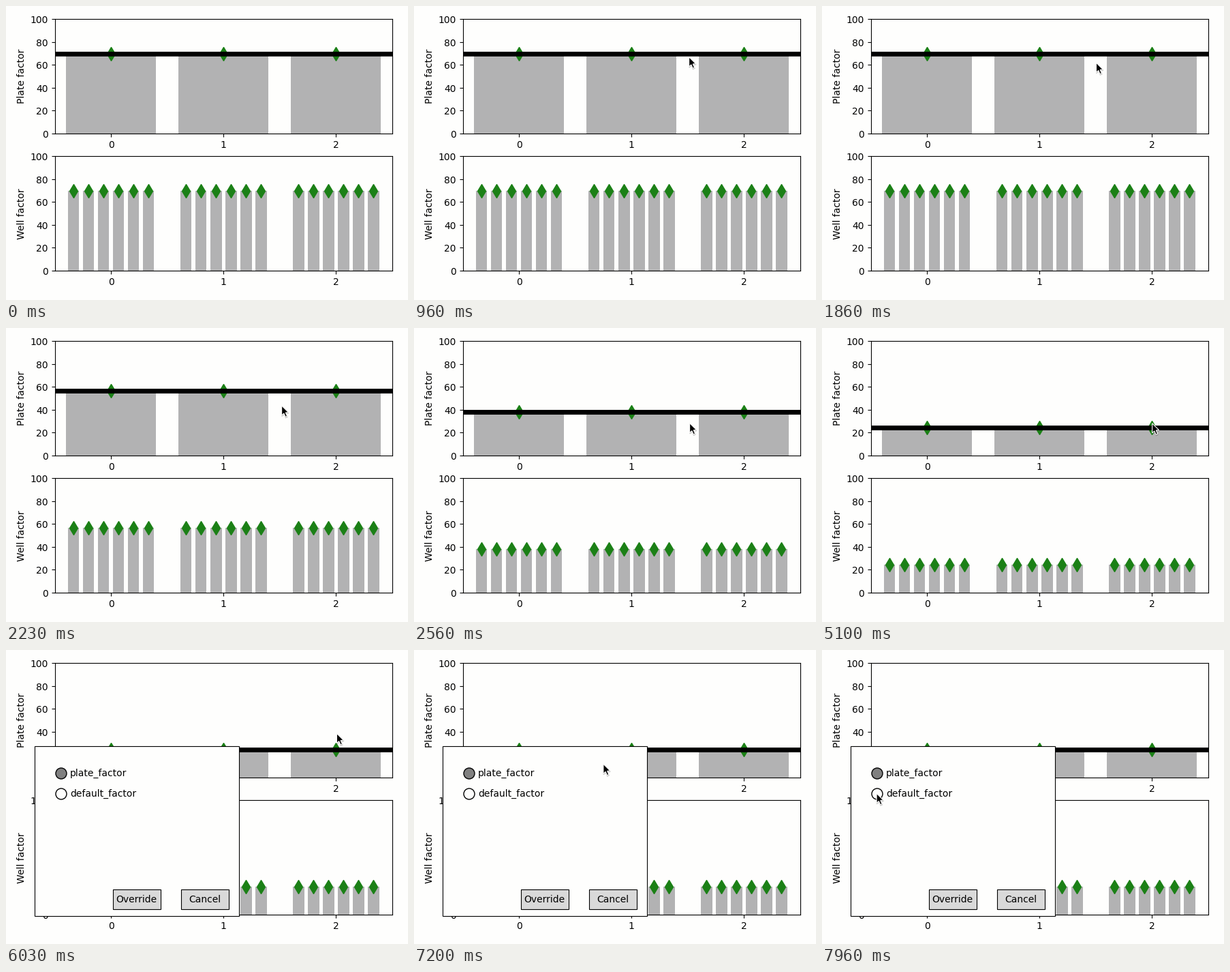
A matplotlib script that plays this animation: 590 by 431 pixels, repeating every 8000 ms.

```python
import numpy as np
import matplotlib.pyplot as plt
from matplotlib.animation import FuncAnimation
from matplotlib.patches import Circle, Polygon, Rectangle

W, H, DPI = 590, 431, 100
INTERVAL, FRAMES = 25, 320
PAPER, BAR, GREEN = "#fefefd", "#b2b2b3", "#1b8016"
LEFT, RIGHT, AXES_HEIGHT = 71.5, 567, 167.5
DIALOG_TIME = 5730

plt.rcParams["font.family"] = "DejaVu Sans"
plt.rcParams["font.size"] = 10
# The small surplus keeps the pixel size from being rounded down
fig = plt.figure(figsize=((W + 0.01) / DPI, (H + 0.01) / DPI), dpi=DPI, facecolor=PAPER)


def factor_axes(bottom, label):
    ax = fig.add_axes([LEFT / W, 1 - bottom / H, (RIGHT - LEFT) / W, AXES_HEIGHT / H],
                      facecolor=PAPER)
    ax.set(xlim=(-0.5, 2.5), ylim=(0, 100), xticks=range(3),
           yticks=range(0, 101, 20), ylabel=label)
    return ax


def bars_with_markers(ax, centers, width):
    bars = ax.bar(centers, 70, width, color=BAR, zorder=1)
    markers, = ax.plot(centers, np.full(len(centers), 70), "d", ms=10, color=GREEN, zorder=2.6)
    ax.set(xlim=(-0.5, 2.5), ylim=(0, 100))
    return bars, markers


plate_ax = factor_axes(187, "Plate factor")
well_ax = factor_axes(388, "Well factor")
wells = (np.arange(3)[:, None] + (np.arange(6) - 2.5) * 0.8 / 6).ravel()
groups = [bars_with_markers(plate_ax, np.arange(3), 0.8),
          bars_with_markers(well_ax, wells, 0.1)]
level_line = plate_ax.axhline(70, color="black", lw=5, zorder=3)

# Overlay in pixel coordinates, y pointing down
overlay = fig.add_axes([0, 0, 1, 1], zorder=5)
overlay.set(xlim=(0, W), ylim=(H, 0))
overlay.axis("off")
dialog = []


def box(x, y, w, h, color):
    dialog.append(overlay.add_patch(
        Rectangle((x, y), w, h, fc=color, ec="black", lw=0.8, zorder=5)))


def text(x, y, label, ha):
    dialog.append(overlay.text(x, y, label, ha=ha, va="center", zorder=6))


box(41.5, 141.5, 300, 249, PAPER)
for y, label, color in [(181, "plate_factor", "0.5"), (211, "default_factor", PAPER)]:
    dialog.append(overlay.add_patch(Circle((81, y), 8, fc=color, ec="black", lw=1, zorder=6)))
    text(94, y, label, "left")
for x, label in [(156.5, "Override"), (256.5, "Cancel")]:
    box(x, 351.5, 70, 29, "0.85")
    text(x + 35, 366, label, "center")

ARROW = np.array([(0.6, 0.8), (0.6, 15), (3.8, 12), (6.2, 17.3), (8.6, 16.2),
                  (6.3, 11), (10.6, 10.7)])
shadow = overlay.add_patch(Polygon(ARROW, fc="black", ec="black", lw=1.2, alpha=0.15, zorder=8))
arrow = overlay.add_patch(Polygon(ARROW, fc="black", ec=PAPER, lw=0.8, zorder=9))


def smooth(s):
    return s * s * (3 - 2 * s)


def ease_out(s):
    return 1 - (1 - s) ** 2


def late_smooth(s):
    return smooth(s ** 0.75)


def linear(s):
    return s


# start, end, destination, easing
MOVES = [
    (430, 960, (403, 74), ease_out),
    (1100, 1330, (400, 71), smooth),
    (1490, 1510, (401, 70), smooth),
    (1730, 2230, (404, 113), late_smooth),
    (2230, 2530, (404, 137), linear),
    (2530, 2760, (404, 145), ease_out),
    (4460, 4900, (484, 139), smooth),
    (5100, 5170, (484.5, 138), smooth),
    (5320, 5340, (484.5, 137.5), smooth),
    (5730, 6200, (485, 115), smooth),
    (6860, 7680, (97, 211), late_smooth),
    (7690, 7960, (79.5, 209.5), smooth),
]


def cursor_at(t):
    pos = np.array([565.0, 186.0])
    for start, end, goal, ease in MOVES:
        if t <= start:
            break
        pos += (np.array(goal) - pos) * ease(min(1, (t - start) / (end - start)))
    return pos


def level_at(t):
    return np.interp(t, [1850, 2000, 2230, 2530, 2700, 2850, 3000],
                     [70, 67, 57, 39.3, 31, 26, 24.2])


def update(i):
    t = i * INTERVAL + 6
    level = level_at(t)
    for bars, markers in groups:
        for bar in bars:
            bar.set_height(level)
        markers.set_ydata(np.full(len(bars), level))
    level_line.set_ydata([level, level])

    for artist in dialog:
        artist.set_visible(t >= DIALOG_TIME)
    pos = cursor_at(t)
    arrow.set_xy(ARROW + pos)
    shadow.set_xy(ARROW + pos + (0.3, 1.2))
    for artist in (arrow, shadow):
        artist.set_visible(t >= 430)
    return []


anim = FuncAnimation(fig, update, frames=FRAMES, interval=INTERVAL, repeat=True,
                     init_func=lambda: update(0))
plt.show()
```
